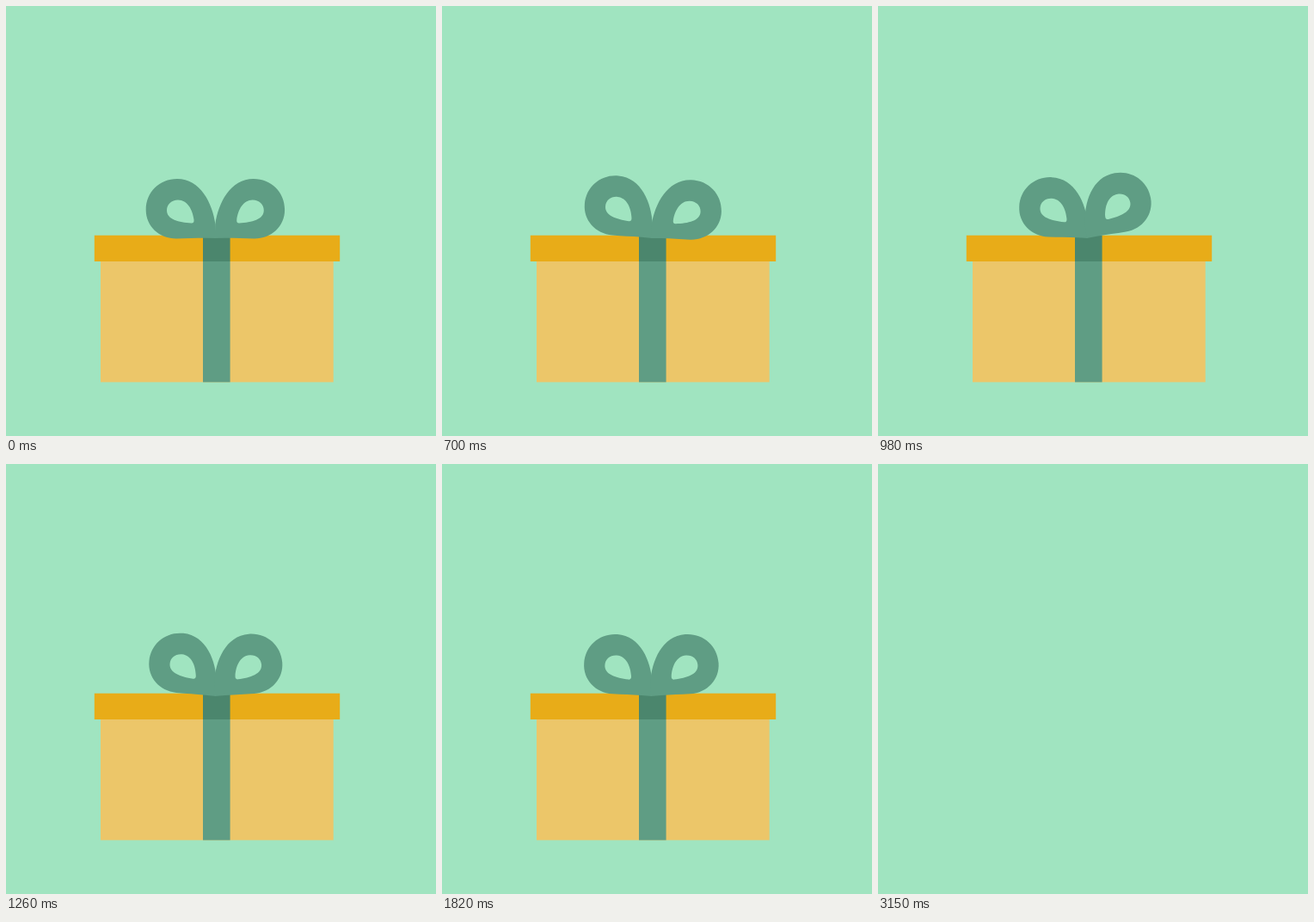
An HTML page that plays this animation: 500 by 500 pixels, repeating every 3220 ms.

```html
<!DOCTYPE html>
<html lang="en">
<head>
<meta charset="utf-8">
<title>Gift</title>
<style>
  html, body { margin: 0; width: 100%; height: 100%; overflow: hidden; background: #a0e4c0; }
  svg { display: block; width: 100%; height: 100%; }
</style>
</head>
<body>
<svg viewBox="0 0 500 500">
  <defs>
    <path id="loop" fill="#5f9d84" fill-rule="evenodd" d="
      M244 270 L232 269.8 C220 269.8 210 270.5 198 270.5
      C178 270.5 162.7 256 162.7 237 C162.7 216.5 178.5 201 199 201
      C226 201 240 229 243.5 254 Z
      M215.5 252.5 C201 251.5 187 248.5 187 237.5
      C187 230.5 192.5 225.5 200 225.5 C211 225.5 217 237 218.5 248.5
      Q219 252.7 215.5 252.5 Z"/>
  </defs>
  <g id="gift">
    <rect x="110" y="297" width="270.7" height="140.4" fill="#ecc669"/>
    <rect x="229" y="297" width="31.6" height="140.4" fill="#5f9d84"/>
    <g id="lid">
      <rect x="102.8" y="266.7" width="285.4" height="30.3" fill="#e8ac18"/>
      <rect x="229" y="266.7" width="31.6" height="30.3" fill="#4b866d"/>
    </g>
    <g id="left"><use href="#loop"/></g>
    <g id="right"><use href="#loop" transform="translate(486.8 0) scale(-1 1)"/></g>
  </g>
</svg>
<script>
const STEP = 70, LOOP = 3220, BLANK_AT = 3150, REST = 30;
const KNOT = [243.4, 270], LID_CENTRE = [245.5, 281.8];

// [step, degrees]
const leftKeys = [[0, 0], [6, 2.5], [10, 5], [14, 2.5], [18, 5.8], [22, 2.5], [26, 4], [30, 0]];
const rightKeys = [[0, 0], [6, -9.3], [10, 1.5], [14, -10], [18, -4.5], [22, -10], [26, -4], [30, 0]];

const byId = id => document.getElementById(id);
const gift = byId('gift'), lid = byId('lid'), left = byId('left'), right = byId('right');

function sample(keys, step) {
  const next = keys.findIndex(key => key[0] >= step);
  if (next < 0) return keys[keys.length - 1][1];
  if (next === 0) return keys[0][1];
  const [s0, a0] = keys[next - 1], [s1, a1] = keys[next];
  const ease = (1 - Math.cos(Math.PI * (step - s0) / (s1 - s0))) / 2;
  return a0 + (a1 - a0) * ease;
}

function rotate(node, angle, pivot) {
  node.setAttribute('transform', `rotate(${angle.toFixed(3)} ${pivot.join(' ')})`);
}

function draw(ms) {
  const time = ms % LOOP;
  const step = Math.min(Math.floor(time / STEP), REST);
  gift.style.display = time >= BLANK_AT ? 'none' : '';
  rotate(lid, 2.3 * Math.sin(step * Math.PI / 2), LID_CENTRE);
  rotate(left, sample(leftKeys, step), KNOT);
  rotate(right, sample(rightKeys, step), KNOT);
}

const start = performance.now();
function tick() {
  draw(performance.now() - start);
  requestAnimationFrame(tick);
}
tick();
</script>
</body>
</html>
```
